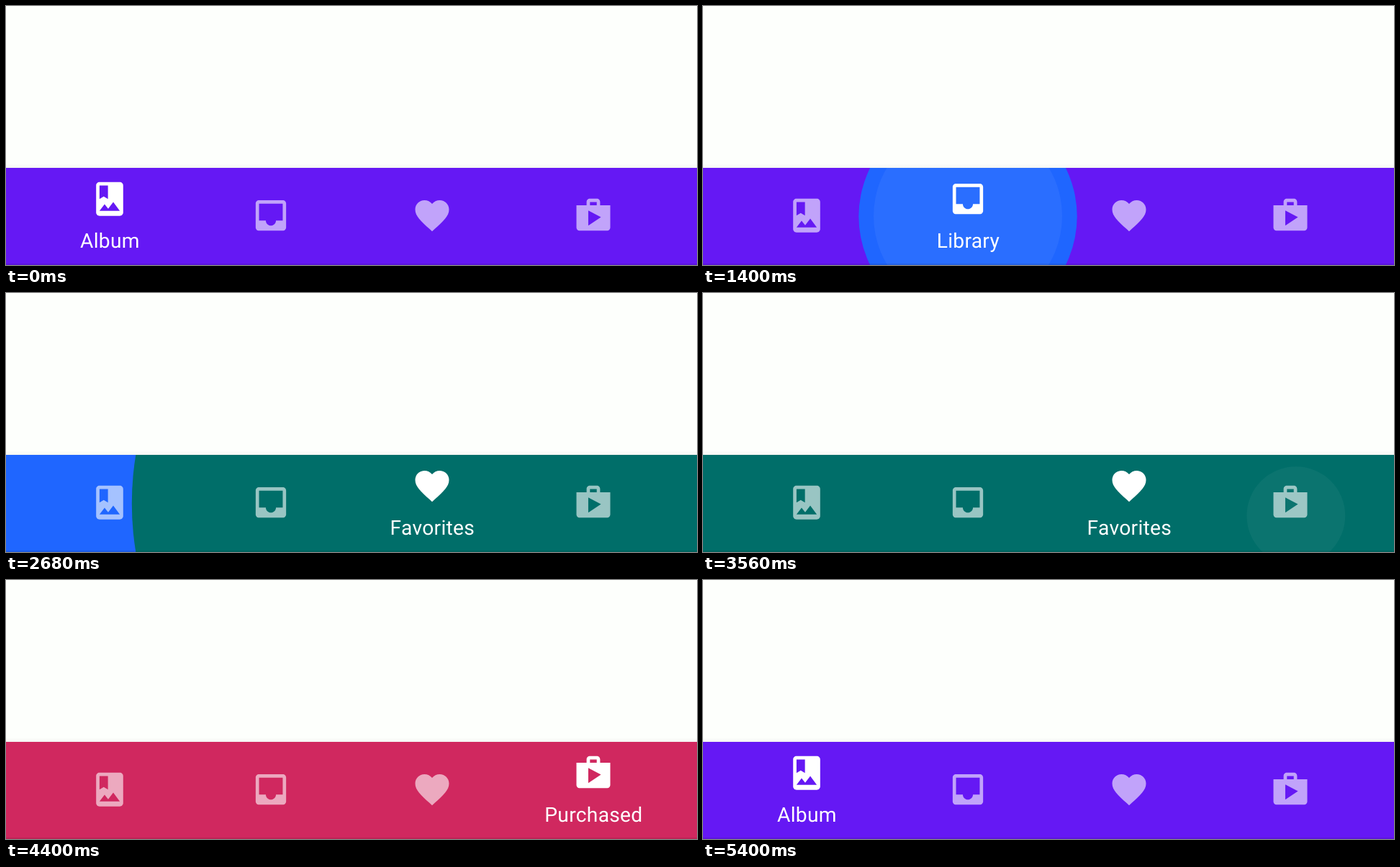
Recreate the animation shown at these times as an HTML page. Size 960x360 px, loop 5.44 s.

```html
<!DOCTYPE html>
<html lang="en">
<head>
<meta charset="utf-8">
<title>Bottom navigation</title>
<style>
  html, body { margin: 0; width: 100%; height: 100%; overflow: hidden; background: #fdfffc; }
  svg { display: block; width: 960px; height: 360px; }
  text {
    font: 28.2px Roboto, Arial, sans-serif;
    letter-spacing: .3px;
    text-anchor: middle;
    text-rendering: geometricPrecision;
    fill: #fff;
  }
  path { fill: #fff; fill-rule: evenodd; }
</style>
</head>
<body>
<svg id="stage" viewBox="0 0 960 360">
  <defs>
    <clipPath id="bar"><rect y="225" width="960" height="135"/></clipPath>
    <linearGradient id="shade" x1="0" y1="0" x2="0" y2="1">
      <stop offset="0" stop-opacity="0"/>
      <stop offset="1" stop-opacity=".035"/>
    </linearGradient>
  </defs>
  <rect y="219" width="960" height="6" fill="url(#shade)"/>
  <g clip-path="url(#bar)">
    <rect id="base" y="225" width="960" height="135"/>
    <circle id="reveal" cy="292.5"/>
    <circle id="ripple" fill="#fff"/>
    <rect y="358" width="960" height="2" fill-opacity=".1"/>
  </g>
  <g id="items"></g>
</svg>
<script>
const LOOP = 5440;
const MOVE = 115, REVEAL = 330, RIPPLE = 225, LEAD = 123;
const MID = 292, SCALE = 2.35;

const items = [
  { label: 'Album', x: 144, color: '#6518f4',
    icon: 'M18 2H6c-1.1 0-2 .9-2 2v16c0 1.1.9 2 2 2h12c1.1 0 2-.9 2-2V4c0-1.1-.9-2-2-2zM6 4h5v8l-2.5-1.5L6 12V4zm0 15l3-3.86 2.14 2.58 3-3.86L18 19H6z' },
  { label: 'Library', x: 368, color: '#1f66ff',
    icon: 'M19 3H4.99c-1.11 0-1.98.89-1.98 2L3 19c0 1.1.88 2 1.99 2H19c1.1 0 2-.9 2-2V5c0-1.11-.9-2-2-2zm0 12h-4c0 1.66-1.35 3-3 3s-3-1.34-3-3H4.99V5H19v10z' },
  { label: 'Favorites', x: 592, color: '#006e69',
    icon: 'M12 21.35l-1.45-1.32C5.4 15.36 2 12.28 2 8.5 2 5.42 4.42 3 7.5 3c1.74 0 3.41.81 4.5 2.09C13.09 3.81 14.76 3 16.5 3 19.58 3 22 5.42 22 8.5c0 3.78-3.4 6.86-8.55 11.54L12 21.35z' },
  { label: 'Purchased', x: 816, color: '#d0285f',
    icon: 'M16 6V4c0-1.11-.89-2-2-2h-4c-1.11 0-2 .89-2 2v2H2v13c0 1.11.89 2 2 2h16c1.11 0 2-.89 2-2V6h-6zm-6-2h4v2h-4V4zM9 18V9l7.5 4L9 18z' }
];

// Moment of each selection and the touch offset from the item's centre.
const taps = [
  { at: 1290, from: 0, to: 1, dx: 12, dy: 18 },
  { at: 2473, from: 1, to: 2, dx: 10, dy: 18 },
  { at: 3663, from: 2, to: 3, dx: 8, dy: 18 },
  { at: 5055, from: 3, to: 0, dx: 17.6, dy: 22 }
];

const $ = id => document.getElementById(id);
const clamp = v => Math.min(1, Math.max(0, v));
const lerp = (a, b, p) => a + (b - a) * p;
const smooth = p => (1 - Math.cos(Math.PI * p)) / 2;

function set(el, attrs) {
  for (const name in attrs) el.setAttribute(name, attrs[name]);
}

function add(tag, attrs) {
  const el = document.createElementNS('http://www.w3.org/2000/svg', tag);
  set(el, attrs);
  return $('items').appendChild(el);
}

// cubic-bezier(.4, 0, .2, 1)
function standard(x) {
  if (x <= 0 || x >= 1) return clamp(x);
  let lo = 0, hi = 1;
  for (let i = 0; i < 24; i++) {
    const s = (lo + hi) / 2, r = 1 - s;
    if (1.2 * r * r * s + 0.6 * r * s * s + s * s * s < x) lo = s; else hi = s;
  }
  return lo * lo * (3 - 2 * lo);
}

for (const item of items) {
  item.path = add('path', { d: item.icon });
  item.text = add('text', {});
  item.text.textContent = item.label;
}

function drawItem(item, active) {
  const y = lerp(291.2, 268.2, active);
  set(item.path, {
    transform: `translate(${item.x} ${y}) scale(${SCALE}) translate(-12 -12)`,
    'fill-opacity': lerp(0.6, 1, active)
  });
  set(item.text, {
    transform: `translate(${item.x + 0.4} 335.5) scale(${lerp(0.5, 1, active)})`,
    opacity: active
  });
}

function drawRipple(t) {
  const tap = taps.find(k => t >= k.at - LEAD && t < k.at - LEAD + 300);
  if (!tap) return set($('ripple'), { opacity: 0 });
  const age = t - tap.at + LEAD;
  const p = standard(age / RIPPLE);
  set($('ripple'), {
    cx: items[tap.to].x + tap.dx * (1 - p),
    cy: MID + tap.dy * (1 - p),
    r: lerp(67, 131, p),
    opacity: 0.12 * clamp(age / 60) * clamp((300 - age) / 150)
  });
}

function draw(t) {
  const tap = taps.filter(k => t >= k.at).pop() || { at: -LOOP, from: 3, to: 0 };
  const { from, to } = tap;
  const moved = standard((t - tap.at) / MOVE);
  const x = items[to].x;
  const far = Math.hypot(Math.max(x, 960 - x), 67.5);

  set($('base'), { fill: items[from].color });
  set($('reveal'), {
    cx: x,
    r: (far + 1) * smooth(clamp((t - tap.at) / REVEAL)),
    fill: items[to].color
  });
  items.forEach((item, i) => drawItem(item, i === to ? moved : i === from ? 1 - moved : 0));
  drawRipple(t);
}

const start = performance.now();
function tick() {
  draw((performance.now() - start) % LOOP);
  requestAnimationFrame(tick);
}
tick();
</script>
</body>
</html>
```
